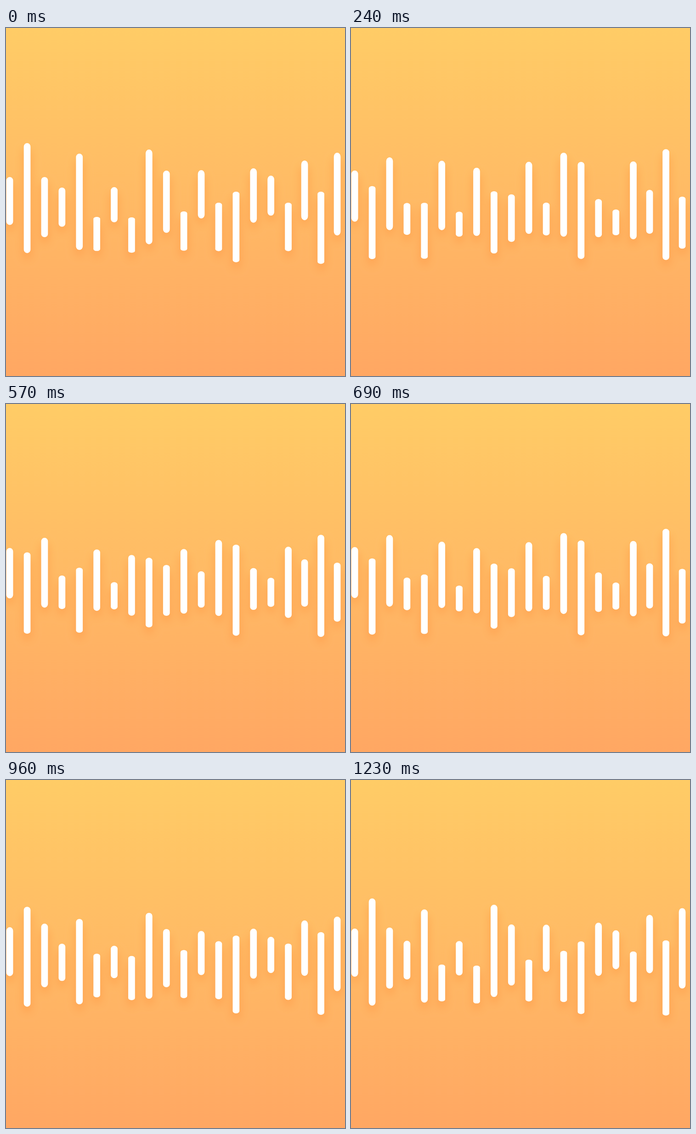
Recreate the animation shown at these times as an HTML page with a canvas. Size 738 by 759 pixels, loop 1.26 s.

```html
<!DOCTYPE html>
<html lang="en">
<head>
<meta charset="utf-8">
<title>Sound wave</title>
<style>
  html, body { margin: 0; width: 100%; height: 100%; overflow: hidden; }
  canvas { display: block; }
</style>
</head>
<body>
<canvas id="stage" width="738" height="759"></canvas>
<script>
const ctx = document.getElementById('stage').getContext('2d');
const WIDTH = 738, HEIGHT = 759;
const STEP = 30, STEPS = 42;
const ANCHOR = 530;      // every bar scales vertically about this line
const BAR = 14.7;
const REST_SPAN = 290;   // top + bottom distance from the anchor at scale 1

// Each bar swings between two reaches above the anchor, one per even or odd beat;
// its lower end stays at a fixed percentage of the reach.
const bars = [
  [49, 205, 220], [14, 279, 181], [36, 205, 250], [53, 182, 147], [18, 256, 144],
  [37, 118, 246], [58, 183, 127], [34, 117, 230], [22, 265, 170], [38, 219, 165],
  [34, 130, 243], [52, 220, 146], [29, 149, 263], [11, 173, 241], [47, 224, 154],
  [58, 208, 131], [29, 149, 243], [46, 241, 174], [9, 173, 270], [30, 258, 158]
].map(([gap, even, odd], i) => ({
  left: .8 + 37.9 * Math.min(i, 16) + 35.5 * Math.max(i - 16, 0),
  ratio: gap / 100,
  reach: [even, odd]
}));
const beats = [0, 7, 15, 21, 30, 36, STEPS];

const background = ctx.createLinearGradient(0, 0, 0, HEIGHT);
background.addColorStop(0, '#ffcc66');
background.addColorStop(1, '#ffa763');

const smooth = p => p * p * (3 - 2 * p);

function draw(step) {
  const next = beats.findIndex(b => b > step);
  const from = beats[next - 1];
  const p = smooth((step - from) / (beats[next] - from));
  const odd = next % 2 ? p : 1 - p;

  ctx.shadowColor = 'transparent';
  ctx.fillStyle = background;
  ctx.fillRect(0, 0, WIDTH, HEIGHT);

  ctx.beginPath();
  for (const { left, ratio, reach } of bars) {
    const top = reach[0] + (reach[1] - reach[0]) * odd;
    const scale = top * (1 + ratio) / REST_SPAN;
    ctx.roundRect(left, ANCHOR - top, BAR, top * (1 - ratio),
      { x: BAR / 2, y: BAR / 2 * scale });
  }
  ctx.shadowColor = 'rgba(255, 135, 50, .5)';
  ctx.shadowBlur = 20;
  ctx.shadowOffsetY = 12;
  ctx.fillStyle = '#fff';
  ctx.fill();
}

const origin = performance.now();
function tick() {
  const elapsed = performance.now() - origin;
  draw(Math.floor(elapsed / STEP) % STEPS);
  requestAnimationFrame(tick);
}
tick();
</script>
</body>
</html>
```
